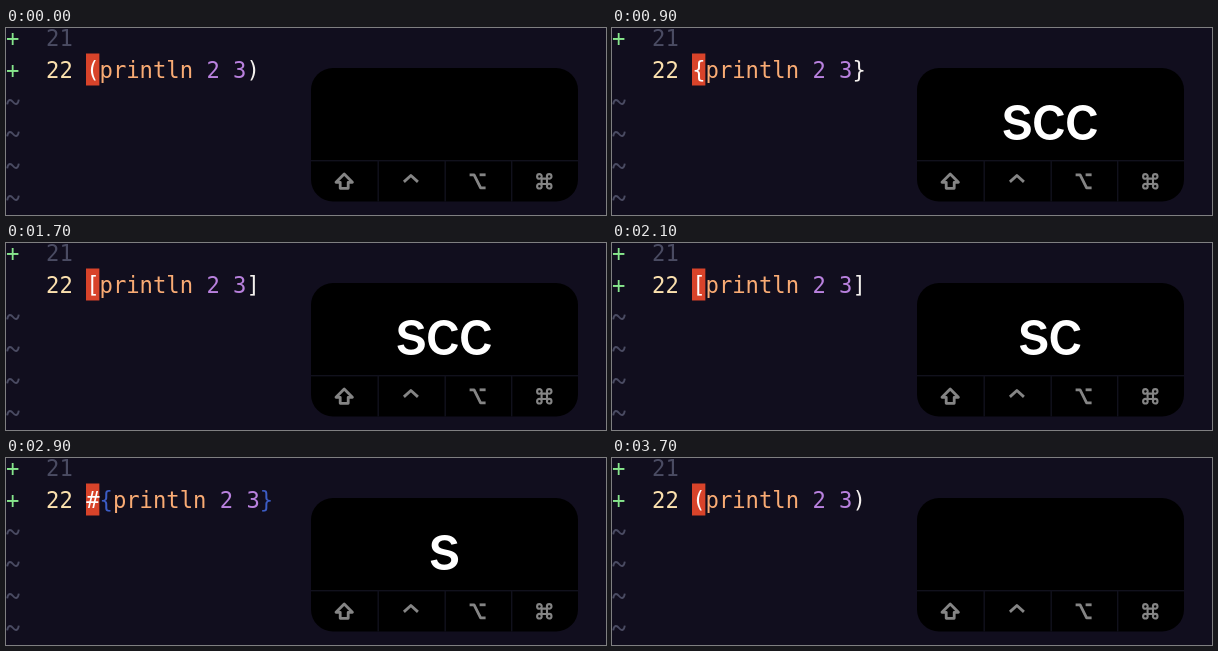
An HTML page with a canvas that plays this animation: 600 px wide and 187 px high, repeating every 3.8 s.

```html
<!DOCTYPE html>
<html lang="en">
<head>
<meta charset="utf-8">
<title>Cycling a collection</title>
<style>
html, body { margin: 0; width: 100%; height: 100%; overflow: hidden; background: #110e1e; }
canvas { display: block; width: 600px; height: 187px; }
</style>
</head>
<body>
<canvas id="stage"></canvas>
<script>
const LOOP = 3800, CELL = 13.36, ROW = 32, BASE = 17.5;
const canvas = document.getElementById('stage');
const ctx = canvas.getContext('2d');
const scale = window.devicePixelRatio || 1;
canvas.width = 600 * scale;
canvas.height = 187 * scale;

const C = {
  bg: '#110e1e', panel: '#000', dim: '#4a4b62', plus: '#86e58c', line: '#fbe0ae',
  cursor: '#d8432a', fn: '#f9ab74', num: '#b981de', paren: '#f4f1ee',
  set: '#3c5cc4', error: '#f20d12', off: '#858585', on: '#fff'
};

// Each track lists [start ms, value]; values hold until the next start.
const TRACKS = {
  form: [[0, '()'], [800, '{}'], [1600, '[]'], [2200, '#{}'], [3300, '()']],
  sign: [[0, '+'], [800, ''], [1100, '>>'], [1600, ''], [1900, '+'],
         [2200, ''], [2400, '+'], [3300, ''], [3500, '+']],
  keys: [[0, ''], [500, 's'], [600, 'sc'], [700, 'scc'], [1200, ''],
         [1400, 's'], [1500, 'sc'], [1600, 'scc'],
         [2000, 's'], [2100, 'sc'], [2200, 'scc'], [2700, ''],
         [2900, 's'], [3000, 'sc'], [3100, 'scc'], [3600, '']],
  mod: [[0, ''], [1200, 'command'], [1300, 'shift'], [1400, '']]
};

function at(track, t) {
  let value = track[0][1];
  for (const [start, v] of track) if (t >= start) value = v;
  return value;
}

function put(text, col, row, color) {
  ctx.fillStyle = color;
  ctx.fillText(text, col * CELL, BASE + row * ROW);
}

function tilde(y) {
  ctx.strokeStyle = C.dim;
  ctx.lineWidth = 1.9;
  ctx.beginPath();
  ctx.moveTo(1.2, y + 2.4);
  ctx.bezierCurveTo(2.2, y - 3.6, 5, y - 2.6, 7, y);
  ctx.bezierCurveTo(9, y + 2.6, 11.8, y + 3.6, 12.8, y - 2.4);
  ctx.stroke();
}

function drawEditor(form, sign) {
  ctx.font = '22.2px "DejaVu Sans Mono", monospace';
  ctx.textAlign = 'left';
  ctx.letterSpacing = '0px';
  put('+', 0, 0, C.plus);
  put('21', 3, 0, C.dim);
  for (let row = 2; row < 6; row++) tilde(row * ROW + 10);

  const error = sign === '>>';
  put(sign, 0, 1, error ? C.error : C.plus);
  put('22', 3, 1, error ? C.error : C.line);

  ctx.fillStyle = C.cursor;
  ctx.fillRect(80, 25.5, CELL, ROW);
  const open = form.slice(0, -1), close = form.slice(-1);
  const isSet = open.length > 1;
  const col = 6 + open.length;
  put(open[0], 6, 1, '#fff');
  if (isSet) put('{', 7, 1, C.set);
  put('println', col, 1, C.fn);
  put('2', col + 8, 1, C.num);
  put('3', col + 10, 1, C.num);
  put(close, col + 11, 1, isSet ? C.set : C.paren);
  if (error) {
    ctx.fillStyle = '#9b929d';
    ctx.fillRect((col + 10) * CELL, 54, CELL - 1.5, 1);
  }
}

function poly(points, closed) {
  ctx.beginPath();
  points.forEach(([x, y]) => ctx.lineTo(x, y));
  if (closed) ctx.closePath();
  ctx.stroke();
}

const ICONS = {
  shift() {
    poly([[0, -7.2], [8.2, 1], [4, 1], [4, 7], [-4, 7], [-4, 1], [-8.2, 1]], true);
  },
  control() {
    poly([[-7, 0.6], [0, -5.8], [7, 0.6]]);
  },
  option() {
    poly([[-8, -6.5], [-3.5, -6.5], [3, 6.5], [8, 6.5]]);
    poly([[2, -6.5], [8, -6.5]]);
  },
  command() {
    ctx.strokeRect(-2.7, -2.7, 5.4, 5.4);
    for (const sx of [-1, 1]) for (const sy of [-1, 1]) {
      ctx.beginPath();
      ctx.arc(sx * 4.9, sy * 4.9, 2.3, 0, Math.PI * 2);
      ctx.stroke();
    }
  }
};

function drawPanel(keys, mod) {
  ctx.fillStyle = C.panel;
  ctx.beginPath();
  ctx.roundRect(305, 40, 267, 133.5, 22);
  ctx.fill();

  ctx.fillStyle = '#11111c';
  ctx.fillRect(305, 132, 267, 1.4);
  for (const x of [371.5, 438.5, 505]) ctx.fillRect(x, 132, 1.4, 41.5);

  Object.keys(ICONS).forEach((name, i) => {
    ctx.save();
    ctx.translate(338.2 + i * 66.7, 153.3);
    ctx.strokeStyle = name === mod ? C.on : C.off;
    ctx.lineWidth = name === 'command' ? 2.1 : 2.8;
    ctx.lineJoin = 'round';
    ICONS[name]();
    ctx.restore();
  });

  ctx.font = '500 61.5px Inter, sans-serif';
  ctx.textAlign = 'center';
  ctx.letterSpacing = '-2.4px';
  ctx.fillStyle = '#fff';
  ctx.fillText(keys, 437, 110.5);
}

function frame(now) {
  const t = now % LOOP;
  ctx.setTransform(scale, 0, 0, scale, 0, 0);
  ctx.fillStyle = C.bg;
  ctx.fillRect(0, 0, 600, 187);
  drawEditor(at(TRACKS.form, t), at(TRACKS.sign, t));
  drawPanel(at(TRACKS.keys, t), at(TRACKS.mod, t));
  requestAnimationFrame(frame);
}

requestAnimationFrame(frame);
</script>
</body>
</html>
```
